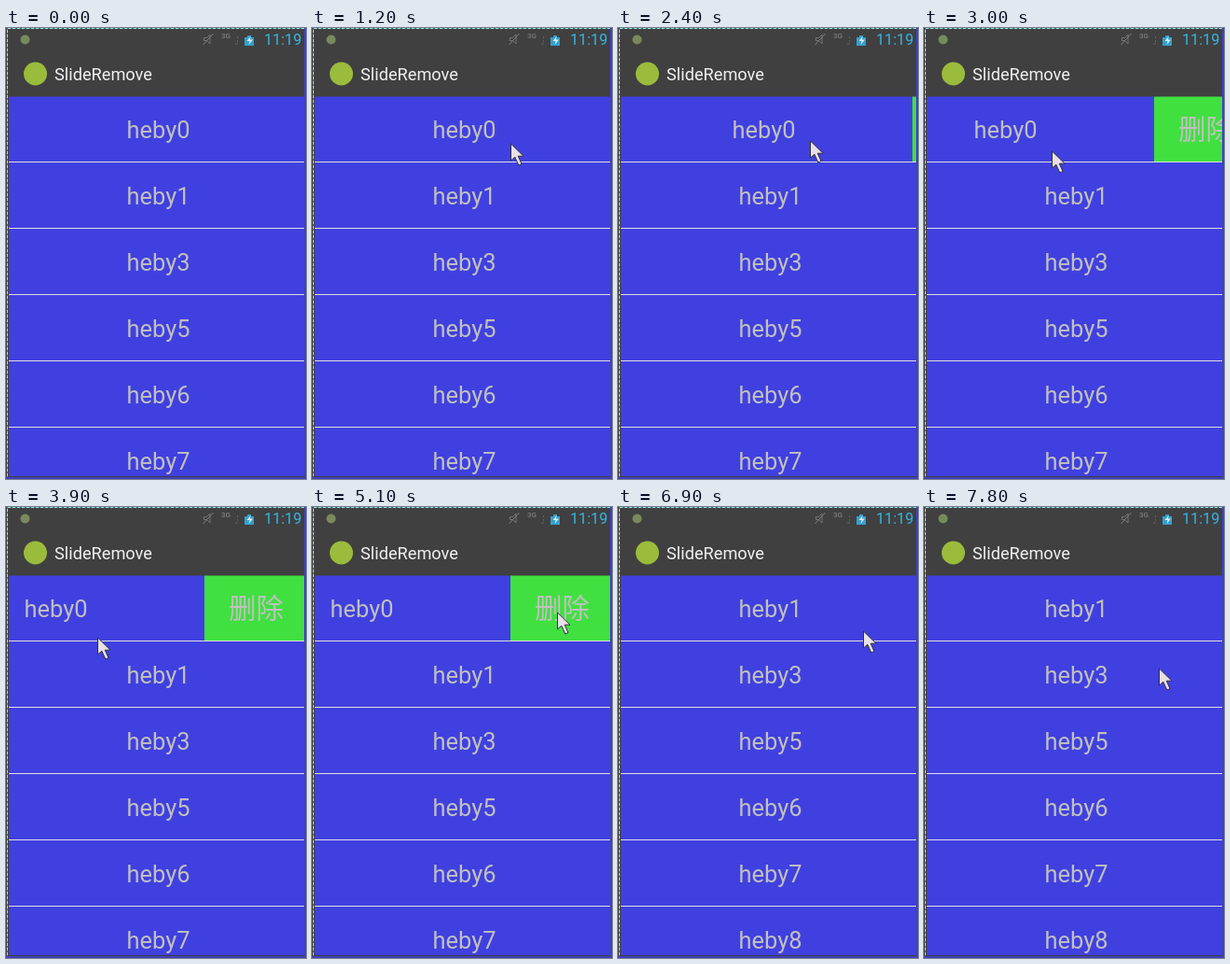
Write an HTML page that moves like this. It is 322 px wide and 483 px high and loops after 8000 ms.

```html
<!DOCTYPE html>
<html lang="en">
<head>
<meta charset="utf-8">
<title>SlideRemove</title>
<style>
  html, body { margin: 0; width: 100%; height: 100%; overflow: hidden; background: #404040; }
  svg { display: block; width: 322px; height: 483px; font-family: Roboto, "Noto Sans CJK SC", "Noto Sans CJK", sans-serif; }
  .rows text { font-size: 25.4px; fill: #c0c0c0; text-anchor: middle; }
  .rows .delete { font-size: 29.5px; font-family: "Noto Sans CJK SC", "Noto Sans CJK", sans-serif; }
  .list, .swipe, .pointer { animation: 8s step-end infinite; }
  .list { animation-name: list; }
  .swipe { animation-name: swipe; }
  .pointer { animation-name: pointer; }

  @keyframes list {
    0% { transform: translateY(0); }
    78.75%, 100% { transform: translateY(-71px); }
  }
  @keyframes swipe {
    0% { transform: translateX(0); }
    30% { transform: translateX(-7px); }
    33.75% { transform: translateX(-30px); }
    37.5% { transform: translateX(-76px); }
    41.25%, 100% { transform: translateX(-110px); }
  }
  @keyframes pointer {
    0% { transform: translate(-40px, 146px); }
    3.75% { transform: translate(112px, 146px); }
    7.5% { transform: translate(111px, 138px); }
    11.25% { transform: translate(147px, 135px); }
    15% { transform: translate(213px, 123px); }
    18.75% { transform: translate(233px, 120px); }
    22.5% { transform: translate(234px, 120px); }
    26.25% { transform: translate(213px, 120px); }
    30% { transform: translate(206px, 120px); }
    33.75% { transform: translate(183px, 122px); }
    37.5% { transform: translate(137px, 131px); }
    41.25% { transform: translate(86px, 137px); }
    45% { transform: translate(98px, 139px); }
    52.5% { transform: translate(106px, 128px); }
    56.25% { transform: translate(225px, 122px); }
    60% { transform: translate(256px, 113px); }
    63.75% { transform: translate(263px, 112px); }
    82.5% { transform: translate(264px, 112px); }
    86.25% { transform: translate(263px, 132px); }
    90% { transform: translate(257px, 158px); }
    93.75% { transform: translate(252px, 171px); }
    97.5%, 100% { transform: translate(252px, 172px); }
  }
</style>
</head>
<body>
<svg viewBox="0 0 322 483" xmlns="http://www.w3.org/2000/svg">
  <defs>
    <clipPath id="screen"><rect x="3" y="73" width="317" height="407"/></clipPath>
  </defs>
  <rect width="322" height="483" fill="#404040"/>

  <!-- status bar -->
  <circle cx="20.5" cy="12.5" r="5" fill="#788a5c"/>
  <g fill="none" stroke="#808080">
    <path d="M212.500 10.500h3l3.500-3.500v10l-3.500-3.500h-3z" stroke-width=".8"/>
    <path d="M211.500 18L222.500 6"/>
  </g>
  <text x="231" y="11" font-size="8" fill="#8c8c8c">3G</text>
  <path d="M248.500 9v2M248.500 13v2M246 17h3" stroke="#606060"/>
  <path d="M256 10h3v-2h4v2h3v9h-10z" fill="#33a0d0"/>
  <path d="M262.500 9l-4 5h3l-1 4 4.500-5.500h-3z" fill="#e0e8ec"/>
  <text x="277" y="18" font-size="16.2" fill="#33b5e5">11:19</text>

  <!-- title bar -->
  <circle cx="31.500" cy="49" r="12.500" fill="#9bbb3c"/>
  <text x="52" y="56" font-size="18.2" fill="#f0f0f0">SlideRemove</text>

  <!-- list -->
  <g class="rows" clip-path="url(#screen)">
    <rect x="3" y="73" width="317" height="407" fill="#4040e0"/>
    <g class="list">
      <g class="swipe">
        <text x="163.500" y="118">heby0</text>
        <rect x="323" y="73" width="110" height="70" fill="#40e040"/>
        <text class="delete" x="378.500" y="118.700">删除</text>
      </g>
      <text x="163.500" y="189">heby1</text>
      <text x="163.500" y="260">heby3</text>
      <text x="163.500" y="331">heby5</text>
      <text x="163.500" y="402">heby6</text>
      <text x="163.500" y="473">heby7</text>
      <text x="163.500" y="544">heby8</text>
    </g>
    <path d="M3 143.500H320M3 214.500H320M3 285.500H320M3 356.500H320M3 427.500H320" stroke="#e0e0e0"/>
    <rect x="3" y="73" width="317" height="1" fill="#404040" opacity=".5"/>
  </g>

  <!-- window edge -->
  <path d="M320 0h2v483H0v-2h320z" fill="#4040c0"/>
  <g fill="none">
    <path d="M320 .5H1.500V481" stroke="#408080"/>
    <path d="M320 .5H1.500V481" stroke="#a0e0e0" stroke-dasharray="3 2"/>
  </g>

  <g class="pointer">
    <path d="M.5 1V19L4.800 15.200 8.800 24 12 22.500 8.200 14.200H14z" fill="#e8e0e8" stroke="#303038" stroke-linejoin="round"/>
  </g>
</svg>
</body>
</html>
```
